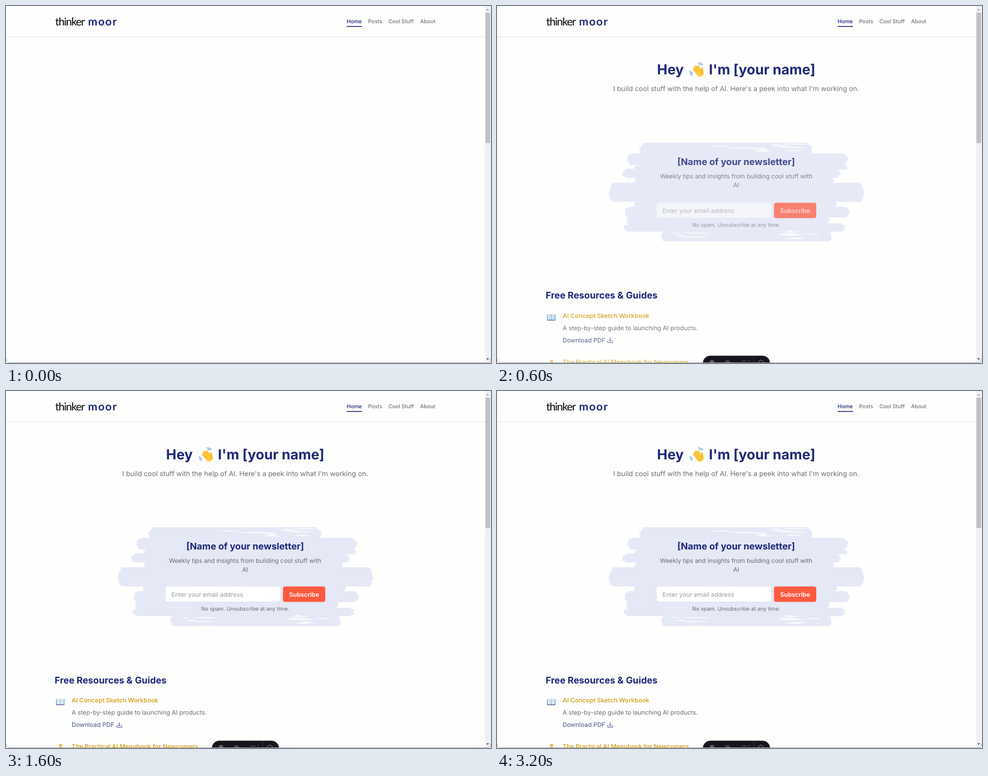
Write an HTML page with a canvas that moves like this. It is 872 px wide and 642 px high and loops after 3600 ms.

```html
<!DOCTYPE html>
<html lang="en">
<head>
<meta charset="utf-8">
<title>Landing page</title>
<style>
html, body { margin: 0; width: 100%; height: 100%; overflow: hidden; background: #fefefd; }
canvas, svg { position: absolute; left: 0; top: 0; width: 872px; height: 642px; }
text { font-family: Inter, "Open Sans", sans-serif; text-rendering: geometricPrecision; }
.mid { text-anchor: middle; }
.h1 { font-size: 24.9px; font-weight: 700; fill: #1e277a; }
.h2 { font-size: 16.6px; font-weight: 700; fill: #1e277a; }
.lead { font-size: 12.4px; fill: #6d6c74; }
.body { font-size: 11px; fill: #6d6c74; }
.small { font-size: 9.6px; fill: #6d6c74; }
.nav { font-size: 9.6px; font-weight: 500; fill: #78716f; }
.gold { font-size: 11px; font-weight: 600; fill: #d3a62b; }
.link { font-size: 11px; fill: #42527f; }
.thin { font: 400 19.5px Lato, sans-serif; letter-spacing: -1.1px; }
.bold { font: 700 20px Lato, sans-serif; letter-spacing: 1.4px; fill: #1e277a; }
</style>
</head>
<body>
<canvas id="stage" width="872" height="642"></canvas>
<svg viewBox="0 0 872 642">
  <text class="thin" x="88.5" y="35">thinker</text>
  <text class="bold" x="147.5" y="35">moor</text>
  <text class="nav" x="612.5" y="31" style="fill:#1e277a">Home</text>
  <text class="nav" x="651" y="31">Posts</text>
  <text class="nav" x="687.5" y="31">Cool Stuff</text>
  <text class="nav" x="744.5" y="31">About</text>
  <g data-part="title">
    <text class="h1" x="287.8" y="123">Hey</text>
    <text class="h1" x="381" y="123">I'm [your name]</text>
    <text class="h2" x="87.5" y="525.5">Free Resources &amp; Guides</text>
  </g>
  <g data-part="lead">
    <text class="lead mid" x="430" y="153">I build cool stuff with the help of AI. Here's a peek into what I'm working on.</text>
  </g>
  <g data-part="news">
    <text class="h2 mid" x="430" y="285">[Name of your newsletter]</text>
    <text class="body mid" x="430" y="309">Weekly tips and insights from building cool stuff with</text>
    <text class="body mid" x="430" y="325">AI</text>
  </g>
  <g data-part="form">
    <text class="body" x="297.5" y="369.5" style="fill:#9a9ba6">Enter your email address</text>
    <text class="body mid" x="536" y="369.5" style="font-weight:600;fill:#fff">Subscribe</text>
    <text class="small mid" x="430" y="395">No spam. Unsubscribe at any time.</text>
  </g>
  <g data-part="item1">
    <text class="gold" x="118" y="560">AI Concept Sketch Workbook</text>
    <text class="body" x="118" y="582">A step-by-step guide to launching AI products.</text>
    <text class="link" x="118" y="604">Download PDF</text>
  </g>
  <g data-part="item2">
    <text class="gold" x="118" y="642.5">The Practical AI Menubook for Newcomers</text>
  </g>
</svg>
<script>
const ctx = document.getElementById('stage').getContext('2d');
const LOOP = 3600, STEP = 200, FADE = 500, RISE = 6.7;
const PAPER = '#fefefd', NAVY = '#1e277a', GREY = '#5d5f66';
const delays = { title: 100, lead: 215, brush: 265, news: 310, form: 390, item1: 255, item2: 360 };
const groups = document.querySelectorAll('[data-part]');

// Ease-out entrance: 0 hidden, 1 settled.
function shown(part, t) {
  const p = Math.min(1, Math.max(0, (t - delays[part]) / FADE));
  return 1 - (1 - p) ** 2;
}

function seeded(seed) {
  return () => (seed = seed * 16807 % 2147483647) / 2147483647;
}

function box(x, y, w, h, r, fill) {
  ctx.fillStyle = fill;
  ctx.beginPath();
  ctx.roundRect(x, y, w, h, r);
  ctx.fill();
}

function dot(x, y, r, fill) {
  box(x - r, y - r, 2 * r, 2 * r, r, fill);
}

function shape(path, fill) {
  ctx.fillStyle = fill;
  ctx.fill(new Path2D(path));
}

function line(path, color, width) {
  ctx.strokeStyle = color;
  ctx.lineWidth = width;
  ctx.stroke(new Path2D(path));
}

function part(name, t, draw) {
  const k = shown(name, t);
  if (!k) return;
  ctx.save();
  ctx.globalAlpha = k;
  ctx.translate(0, RISE * (1 - k));
  draw();
  ctx.restore();
}

// Brush strokes: bottom of each stroke, its left and right end.
const strokes = [
  [264, 255, 568], [283, 233, 632], [292, 246, 632], [306, 223, 618], [317, 246, 607],
  [349, 200, 661], [360, 246, 612], [377, 228, 636], [390, 231, 600], [403, 227, 628], [421, 294, 603]
];

// Bristles with ragged ends fill each stroke; dry streaks cut through top and bottom.
function brush() {
  const rnd = seeded(41);
  let y = 245;
  ctx.beginPath();
  for (const [bottom, left, right] of strokes) {
    const top = y, height = bottom - top;
    for (; y < bottom; y += 1.5) {
      const round = 7 * Math.abs((y - top) / height * 2 - 1) ** 3;
      const a = left + round + rnd() * 4, b = right - round - rnd() * 4;
      ctx.roundRect(a, y, b - a, 3, 1.5);
    }
    y = bottom;
  }
  ctx.fillStyle = '#e5e8f5';
  ctx.fill();
  ctx.globalAlpha = 1;
  for (let i = 0; i < 24; i++) {
    const low = i % 2, side = rnd();
    const x = low ? (side < .4 ? 280 : 500) + rnd() * 60 : 360 + rnd() * 160;
    const sy = low ? 403 + rnd() * 15 : 247 + rnd() * 14;
    const w = 15 + rnd() * 45;
    shape(`M${x} ${sy}q${w / 2} -1.6 ${w} .4q${-w / 2} 1.4 ${-w} -.4`, PAPER);
  }
}

function form() {
  for (const [x, w, shade, fill] of [[287, 206, '#dcdff0', '#fff'], [498, 76, '#e9c4c4', '#fe5a3f']]) {
    box(x, 352, w, 28, 4, shade);
    box(x, 351.5, w, 27.5, 4, fill);
  }
}

function hand(angle) {
  ctx.translate(361, 116);
  ctx.rotate(angle);
  ctx.lineCap = 'round';
  for (const mid of [-1.2, 2.75])
    for (const [r, span] of [[11.5, .2], [14, .32]]) {
      ctx.beginPath();
      ctx.arc(0, 0, r, mid - span, mid + span);
      ctx.strokeStyle = '#5b93c9';
      ctx.lineWidth = 1.1;
      ctx.stroke();
    }
  ctx.translate(1.5, 1.5);
  ctx.rotate(-.6);
  line('M5 6L8 -1', '#ffc83d', 3.2);
  for (let i = 0; i < 4; i++) {
    const finger = `M${-4.2 + i * 2.8} 3L${-5 + i * 3} ${-7.5 - 2.5 * Math.sin(i)}`;
    line(finger, '#eba72c', 3.3);
    line(finger, '#ffc83d', 2.6);
  }
  box(-5.8, 0, 12.2, 10, 4.5, '#ffc83d');
  line('M6.5 2Q2 3 2.5 7', '#e59600', .7);
}

function book() {
  box(90, 554, 15, 10.8, 1, '#3b8fd6');
  for (const x of [91, 97.8]) {
    box(x, 553, 6.2, 10.3, 1, '#e6eef3');
    for (let y = 555.5; y < 561; y += 2) box(x + 1.3, y, 3.6, .7, 0, '#c3d2dd');
  }
  line('M90 564.7H105', '#c0705f', .7);
}

function chef() {
  box(95, 633, 6, 4, 1.5, '#eceef1');
  dot(98, 638, 2.8, '#ffc83d');
  line('M95.3 636.5H100.7', '#b98a3b', 1);
  box(93, 640.5, 10.5, 6, 3, '#e3e6ea');
  shape('M96.5 640.5H99.5L98 642Z', '#d94b4b');
}

function toolbar() {
  box(370, 628.8, 121, 30, 13.8, '#2c2f37');
  box(371, 629.8, 119, 30, 12.8, '#15161b');
  dot(386.5, 640.5, 4, GREY);
  line('M410 639L417 637.5M411 641L419 640', GREY, 1.4);
  line('M439 638.5H449M439 641.5H449', GREY, 1.2);
  dot(453, 637.5, 1.2, '#4b4d55');
  line('M461.5 629V642', '#34363d', 1);
  line('M469.5 642A5 5 0 0 1 479.5 642M474.5 636V638', GREY, 1.4);
}

function chrome() {
  box(0, 55, 861, 1, 0, '#e6e5e4');
  box(612.5, 36, 27.5, 1.5, 0, NAVY);
  box(861, 0, 11, 642, 0, '#f1f1f1');
  box(862, 12, 8.5, 234.5, 0, '#c1c1c1');
  shape('M863.5 8H868.5L866 5Z', '#a3a3a3');
  shape('M863.5 633.5H868.5L866 636.5Z', '#505050');
}

function draw(t) {
  ctx.fillStyle = PAPER;
  ctx.fillRect(0, 0, 872, 642);
  chrome();

  const hop = t > 620 && t < 1100 ? 5.4 * Math.sin(Math.PI * (t - 620) / 480) : 0;
  const wave = t < 2600 ? .06 * Math.sin(Math.PI * t / 300) : 0;
  part('title', t, () => hand(wave));
  part('brush', t, brush);
  part('form', t, form);
  part('item1', t, () => {
    line('M203.5 595.8V602M201 599.8L203.5 602.3L206 599.8M199 601V604.6H208V601', '#42527f', 1);
    ctx.translate(0, -hop);
    book();
  });
  part('item2', t, () => {
    ctx.translate(0, -hop * .8);
    chef();
  });
  if (t >= STEP) toolbar();
  line('M0.5 634Q0.5 641.5 8 641.5H864Q871.5 641.5 871.5 634', '#aaa', 1);

  for (const g of groups) {
    const k = shown(g.dataset.part, t);
    g.setAttribute('opacity', k);
    g.setAttribute('transform', `translate(0 ${RISE * (1 - k)})`);
  }
}

const start = performance.now();
function tick(now) {
  const t = Math.max(0, now - start) % LOOP;
  draw(Math.floor(t / STEP) * STEP);
  requestAnimationFrame(tick);
}
draw(0);
requestAnimationFrame(tick);
</script>
</body>
</html>
```
